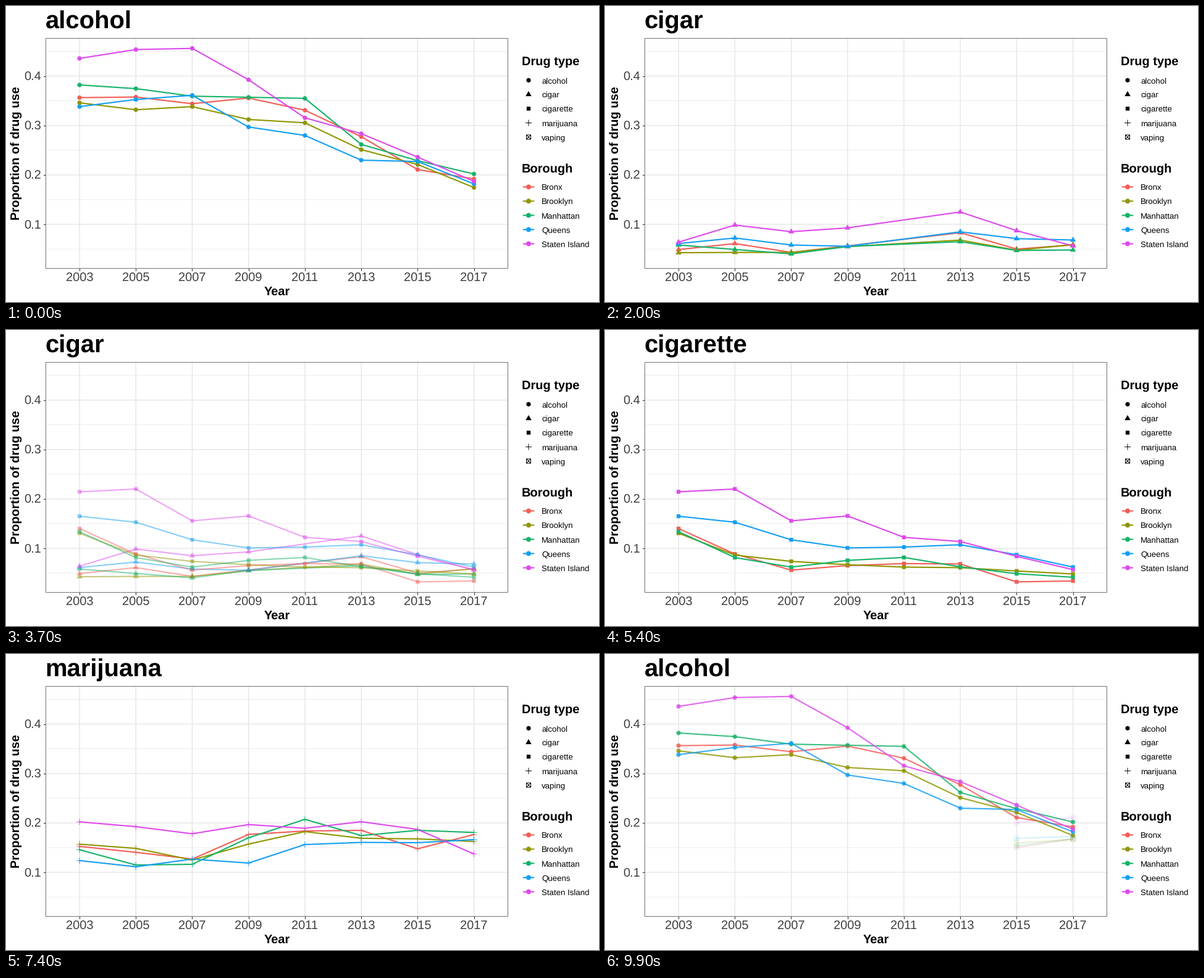
Animation of 960 by 480 pixels, one loop 10000 ms. Source, as a matplotlib script:

```python
import matplotlib.pyplot as plt
from matplotlib.animation import FuncAnimation
from matplotlib.patches import PathPatch, Rectangle
from matplotlib.path import Path
from matplotlib.transforms import Affine2D

W, H, DPI = 960, 480, 80
PX = 72 / DPI                     # points per pixel
HOLD, FADE = 14, 6                # frames per state and per cross-fade
STEP = HOLD + FADE
R = 3.55                          # marker radius

plt.rcParams.update({"font.family": "Liberation Sans", "text.hinting": "none"})

LEFT, TOP, RIGHT, BOTTOM = 64.3, 52, 812.3, 425
YEARS = range(2003, 2018, 2)
DX = (RIGHT - LEFT) / 8.2
XS = [LEFT + DX * (0.6 + i) for i in range(8)]

DRUGS = ["alcohol", "cigar", "cigarette", "marijuana", "vaping"]
BOROUGHS = {
    "Bronx": "#f35e58",
    "Brooklyn": "#909600",
    "Manhattan": "#18b36a",
    "Queens": "#159ff2",
    "Staten Island": "#dc4bec",
}
COLORS = list(BOROUGHS.values())

fig = plt.figure(figsize=(W / DPI, H / DPI), dpi=DPI, facecolor="white")
ax = fig.add_axes([0, 0, 1, 1])
ax.set_xlim(0, W)
ax.set_ylim(H, 0)
ax.axis("off")


def y_of(value):
    return 434.2 - 801.5 * value


def text(x, y, s, size, color="black", **kw):
    return ax.text(x, y, s, fontsize=size * PX, color=color, va="baseline", **kw)


def line(xs, ys, color, width, z=1, **kw):
    return ax.plot(xs, ys, color=color, lw=width * PX, zorder=z, **kw)[0]


def glyph(drug):
    """Marker outline around the origin, in pixels (y points down)."""
    if drug == "alcohol":
        return Path.circle((0, 0), R + 0.05)
    if drug == "cigar":
        top, side, base = -1.555 * R, 1.347 * R, 0.778 * R
        return Path([(0, top), (side, base), (-side, base), (0, top)], closed=True)
    if drug == "marijuana":
        a = 2 ** 0.5 * R
        return Path([(-a, 0), (a, 0), (0, -a), (0, a)], [1, 2, 1, 2])
    a = 0.886 * R if drug == "cigarette" else R
    box = [(-a, -a), (a, -a), (a, a), (-a, a), (-a, -a)]
    if drug == "cigarette":
        return Path(box, closed=True)
    cross = [(-a, -a), (a, a), (-a, a), (a, -a)]
    return Path(box + cross, [1, 2, 2, 2, 79, 1, 2, 1, 2])


def markers(drug, xs, ys, color, z=4):
    shape = glyph(drug)
    path = Path.make_compound_path(
        *[shape.transformed(Affine2D().translate(x, y)) for x, y in zip(xs, ys)])
    if drug in ("marijuana", "vaping"):
        style = dict(fill=False, ec=color, lw=0.95 * PX)
    else:
        style = dict(fc=color, lw=0)
    return ax.add_patch(PathPatch(path, zorder=z, snap=False, **style))


series = {}


def add(drug, *rows, skip=(), first=0):
    """One line with markers per borough; rows hold heights in pixels."""
    xs = [x for i, x in enumerate(XS) if i >= first and i not in skip]
    series[drug] = []
    for ys, color in zip(rows, COLORS):
        series[drug] += [
            line(xs, ys, color, 2.13, z=3, solid_capstyle="butt"),
            markers(drug, xs, ys, color),
        ]


add("alcohol",
    [148.6, 147.6, 158.5, 149.2, 169, 212, 265.2, 280.4],
    [157, 168.2, 163.2, 184, 189.4, 232.9, 257, 294.4],
    [128, 134, 146.2, 148, 149.8, 224.5, 250.8, 272.4],
    [163.2, 151.6, 144.8, 196.2, 209.9, 250, 252.2, 288.4],
    [85, 70.6, 68.7, 119.6, 181.3, 207, 245, 284.3])
add("cigar",
    [395, 385.2, 399.6, 389, 367.6, 394.2, 387.4],
    [400.1, 399.6, 399.6, 390.2, 379.6, 396, 387],
    [387.6, 394.8, 402, 390, 382.2, 396.4, 395.6],
    [385.2, 376.2, 387.6, 389.6, 366.2, 377.2, 379.5],
    [383, 355.2, 366, 359.8, 334, 364.3, 389],
    skip=[4])
add("cigarette",
    [322, 363.2, 389.4, 382, 378.8, 379.4, 408.4, 407],
    [329.5, 365, 375.2, 380.6, 384.5, 385.4, 390.8, 395.6],
    [327, 369, 384.5, 373.6, 368.8, 384, 395.2, 401],
    [302, 311.7, 340.2, 353.4, 352, 348.2, 364.5, 384.5],
    [262.4, 257.8, 309.5, 301.5, 336.2, 343, 367, 388.6])
add("marijuana",
    [312, 321.6, 332.5, 292.6, 287, 286, 315.8, 292.8],
    [308.4, 315.2, 334, 308.2, 288, 298.8, 299.8, 304],
    [317.5, 342.2, 341, 298, 268.2, 294.4, 286, 289.4],
    [335, 345, 332.6, 339, 309, 305.5, 306, 301],
    [272.2, 280, 291.5, 276.6, 282.6, 272, 284.5, 324.2])
add("vaping",
    [314, 300], [306.6, 300.6], [311.2, 299.6], [299, 295.8], [273.5, 265.5],
    first=6)

# Panel, grid and axes
for i in range(5):
    y = y_of(0.05 + 0.1 * i)
    line([LEFT, RIGHT], [y, y], "#e8e8e8", 0.75, snap=False)
for i in range(1, 5):
    y = y_of(i / 10)
    line([LEFT, RIGHT], [y, y], "#e6e6e6", 1.4, snap=False)
    line([60.8, LEFT], [y, y], "#333333", 1.07)
    text(57, y + 7.3, f"{i / 10:.1f}", 20, "#3f3f3f", ha="right")
for x, year in zip(XS, YEARS):
    line([x, x], [TOP, BOTTOM], "#e6e6e6", 1.4, snap=False)
    line([x, x], [BOTTOM, 428.8], "#333333", 1.07)
    text(x, 447.2, year, 20, "#3f3f3f", ha="center")
ax.add_patch(Rectangle((LEFT, TOP), RIGHT - LEFT, BOTTOM - TOP,
                       fill=False, ec="#747474", lw=PX, zorder=6))
text(438.3, 469.2, "Year", 20, ha="center", weight="bold")
text(21.6, 239, "Proportion of drug use", 20, ha="center", weight="bold",
     rotation=90, rotation_mode="anchor")
title = text(63.6, 36.8, "", 40, weight="bold")

# Legends
KEY_X = 846
text(834.6, 97.2, "Drug type", 20, weight="bold")
text(834.6, 270.2, "Borough", 20, weight="bold")
for i, drug in enumerate(DRUGS):
    y = 120.4 + 23.04 * i
    markers(drug, [KEY_X], [y], "black")
    text(867.2, y + 5.3, drug, 13.3)
for i, (name, color) in enumerate(BOROUGHS.items()):
    y = 293.4 + 23.04 * i
    line([836.8, 855.2], [y, y], color, 2.13, z=3,
         solid_capstyle="butt", snap=False)
    ax.add_patch(plt.Circle((KEY_X, y), 4, fc=color, lw=0, zorder=4))
    text(867.2, y + 5.1, name, 13.3)


def update(frame):
    state, tick = divmod(frame, STEP)
    p = max(0, tick - HOLD) / FADE
    now, then = DRUGS[state], DRUGS[(state + 1) % len(DRUGS)]
    for drug, artists in series.items():
        alpha = {now: 1 - p, then: p}.get(drug, 0)
        for artist in artists:
            artist.set_visible(alpha > 0)
            artist.set_alpha(alpha)
    title.set_text(then if p > 0.5 else now)
    return [title]


anim = FuncAnimation(fig, update, frames=STEP * len(DRUGS), interval=100,
                     repeat=True, repeat_delay=0, blit=False)
plt.show()
```
